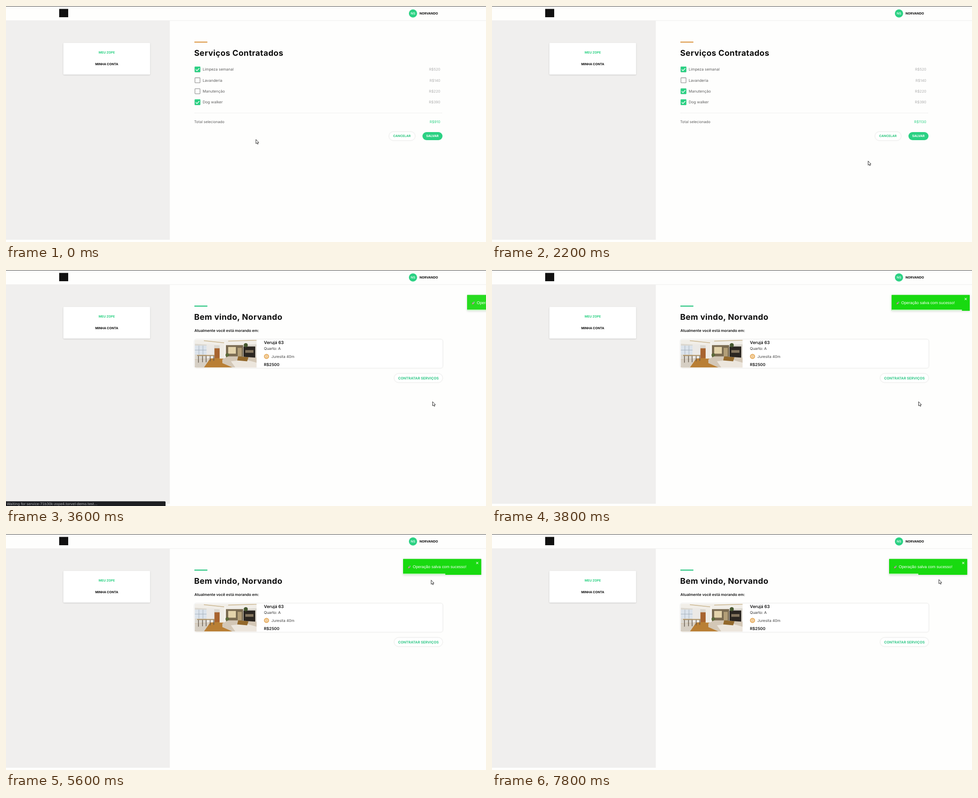
Animation of 1065x526 px, one loop 8000 ms. Source, as an HTML page:

```html
<!DOCTYPE html>
<html lang="pt-BR">
<head>
<meta charset="utf-8">
<title>Serviços</title>
<style>
html, body { margin: 0; width: 100%; height: 100%; overflow: hidden; background: #fefefd; }
svg { display: block; width: 1065px; height: 526px; }
text { font-family: Inter, sans-serif; font-size: 8.4px; fill: #606060; text-rendering: geometricPrecision; white-space: pre; }
.title { font-size: 17.9px; font-weight: 700; letter-spacing: .4px; fill: #0c0c0c; }
.cap { font-size: 7px; font-weight: 700; fill: #0c0c0c; }
.mid { text-anchor: middle; }
.end { text-anchor: end; }
.semi { font-weight: 600; fill: #151515; }
.price { font-size: 8px; fill: #adadad; }
.green { fill: #2bd183; }
.soft { filter: drop-shadow(0 1px 1.5px rgba(0,0,0,.16)); }
.pill { fill: #fff; stroke: #eeeeed; stroke-width: .8; filter: drop-shadow(0 .5px 1px rgba(0,0,0,.1)); }
.toast text { font: 8.9px "Liberation Sans", Arial, sans-serif; fill: #fff; }
.toast .box { filter: drop-shadow(0 1px 2.5px rgba(0,0,0,.14)); }
.status text { font: 7.6px "DejaVu Sans", sans-serif; fill: #b4b5b7; }
</style>
</head>
<body>
<svg viewBox="0 0 1065 526">
  <rect width="1065" height="526" fill="#fefefd"/>
  <rect y="33" width="363.5" height="488" fill="#f0efee"/>
  <rect y="32" width="1065" height="1" fill="#efefee"/>
  <rect width="1065" height="1" fill="#3c3c3c"/>
  <rect x="118" y="6.5" width="20" height="18.5" fill="#111"/>
  <circle class="green" cx="903" cy="16.6" r="9.1"/>
  <text class="cap mid" x="903" y="19" style="fill:#e6fff2;font-weight:600">NS</text>
  <text class="cap" x="917.5" y="19.4">NORVANDO</text>

  <rect class="soft" x="127.3" y="82.3" width="192.4" height="70.4" rx="1.5" fill="#fff"/>
  <text class="cap mid" x="223.5" y="105.6" style="fill:#2bd183">MEU ZOPE</text>
  <text class="cap mid" x="223.5" y="131.6">MINHA CONTA</text>

  <g id="services">
    <rect x="418" y="79.2" width="28.8" height="2.6" fill="#e0a35a"/>
    <text class="title" x="417.5" y="111.2">Serviços Contratados</text>
    <g id="rows"></g>
    <rect x="418" y="238" width="550" height="1" fill="#eeeeed"/>
    <text x="417.5" y="261.2" style="font-size:8.1px">Total selecionado</text>
    <text id="total" class="price end" x="963.6" y="261.2" style="fill:#2bd183"></text>
    <rect class="pill" x="850" y="280.5" width="57.5" height="19" rx="9.5"/>
    <text class="cap mid" x="878.5" y="292.3" style="fill:#2bc67d">CANCELAR</text>
    <rect class="green" x="924" y="281" width="44.5" height="18" rx="9"/>
    <text class="cap mid" x="946" y="292.3" style="fill:#fff">SALVAR</text>
  </g>

  <g id="home">
    <rect x="418" y="79.2" width="28.8" height="2.6" fill="#3dcb8d"/>
    <text class="title" x="417.5" y="111.2">Bem vindo, Norvando</text>
    <text class="semi" x="418" y="138.4">Atualmente você está morando em:</text>
    <rect class="pill" x="418" y="154.5" width="551" height="64" rx="4.5"/>
    <clipPath id="frame"><path d="M137 0H4Q0 0 0 4V58Q0 62 4 62H137V0z"/></clipPath>
    <g transform="translate(419 155.5)" clip-path="url(#frame)">
      <rect width="137" height="62" fill="#dcd8d0"/>
      <path d="M0 0H137V10L66 13L0 9z" fill="#f1eee8"/>
      <path d="M20 2L66 7M74 3L137 1" stroke="#c9b48c" stroke-width="1.6"/>
      <rect y="13" width="26" height="20" fill="#dbe3ec"/>
      <path d="M9 13V33M18 13V33M0 23H26" stroke="#9ba6b1" stroke-width=".8"/>
      <rect x="26" y="10" width="17" height="33" fill="#ebe9e6"/>
      <rect x="43.5" y="19" width="11.5" height="25" fill="#a8642f"/>
      <path d="M0 44L62 40L84 62H0z" fill="#b97f35"/>
      <path d="M0 44L34 42L20 62H0z" fill="#d6cfc4"/>
      <path d="M5 35H44" stroke="#a98a58" stroke-width="2"/>
      <path d="M8 36V51M17 36V50M25 36V50M34 36V48M42 36V47" stroke="#5d5348" stroke-width="1.4"/>
      <rect x="55" y="10" width="10" height="32" fill="#efece5"/>
      <rect x="69" y="12" width="38" height="27" fill="#7a6b51"/>
      <rect x="74" y="16" width="17" height="15" fill="#e3d3ab"/>
      <rect x="95" y="18" width="9" height="19" fill="#b39f78"/>
      <rect x="65" y="5" width="4" height="36" fill="#f5f2ec"/>
      <rect x="108" y="15" width="26" height="30" fill="#2b2621"/>
      <rect x="112" y="23" width="18" height="6" fill="#85765f"/>
      <circle cx="113" cy="12" r="4.5" fill="#45572f"/>
      <circle cx="72" cy="34" r="4" fill="#5d6a3a"/>
      <path d="M61 44L74 37H94L137 40V62H84L61 52z" fill="#d3c7b6"/>
      <path d="M80 48L112 44L137 51V62H90z" fill="#ece6dd"/>
      <path d="M96 37L119 39L116 48L94 46z" fill="#93692c"/>
    </g>
    <text class="semi" x="572.3" y="165" style="font-size:9.5px">Verujá 63</text>
    <text x="572.3" y="178.4" style="font-size:8.3px;fill:#333">Quarto: A</text>
    <circle cx="578" cy="192.6" r="5.6" fill="#e3a552"/>
    <g fill="none" stroke="#fff3e0" stroke-width=".8">
      <circle cx="578" cy="192.6" r="3.4"/>
      <path d="M576.8 189.6V195.6M579.2 189.6V195.6M574.6 192.6H581.4"/>
    </g>
    <text x="588.8" y="195.6" style="font-size:8.25px;fill:#444">Juresita 40m</text>
    <text class="semi" x="572.3" y="213.8" style="font-size:8.9px">R$2500</text>
    <rect class="pill" x="861.5" y="231" width="107" height="19.5" rx="9.75"/>
    <text class="cap mid" x="915" y="243.5" style="font-size:7.8px;fill:#35c98a">CONTRATAR SERVIÇOS</text>
  </g>

  <g id="status" class="status">
    <path d="M0 515.5H352Q354 515.5 354 517.5V526H0z" fill="#1d1e22"/>
    <text x="2" y="524">Waiting for service-71b30k-zope4.torvel-demo.test…</text>
  </g>

  <g id="toast" class="toast">
    <rect class="box" width="173.5" height="35.6" y="55.4" rx=".6" fill="#18da10"/>
    <g transform="translate(14.2 73.3) rotate(45) scale(.8)">
      <path d="M-2 1L-3.4 4H3.4L2 1z" fill="#9c4a3c"/>
      <ellipse rx="2" ry="4.2" fill="#a9b8a6"/>
      <circle cy="-1" r="1.1" fill="#39606e"/>
      <path d="M-1 4.2H1L0 6z" fill="#d9a544"/>
    </g>
    <text x="21.5" y="76.4">Operação salva com sucesso!</text>
    <path d="M162.2 62.3l4.6 4.6m0-4.6l-4.6 4.6" stroke="#e4fbe2" stroke-width="1.1"/>
    <rect id="bar" y="88.3" height="2.7" fill="#fff" opacity=".8"/>
  </g>

  <g id="cursor" stroke="#222" stroke-width=".95" fill="#fff" stroke-linejoin="round">
    <path id="arrow" d="M.5 .5V9.8L2.6 7.9L4.1 11L5.6 10.3L4.2 7.3H6.9z"/>
    <path id="hand" d="M-.8 .9C-.8-.2 .8-.2 .8 .9V3.7L4.5 4.4Q5.6 4.7 5.4 5.8L4.9 8.4Q4.7 9.4 3.7 9.4H.5Q-.3 9.4-.7 8.7L-3.2 5.6Q-2.6 4.6-1.7 5.2L-.8 5.9z"/>
  </g>
</svg>
<script>
const LOOP = 8000, STEP = 100;
const $ = id => document.getElementById(id);
const show = (id, on) => { $(id).style.display = on ? '' : 'none'; };
const within = (t, spans) => spans.some(([a, b]) => t >= a && t < b);

// time, x, y of the pointer tip
const PATH = [
  [300, 554, 297], [400, 550, 293], [600, 510, 262], [800, 452, 207], [1000, 430, 187],
  [1600, 430, 187], [1700, 445, 196], [1900, 600, 270], [2200, 834, 345], [2400, 925, 334],
  [2500, 945, 316], [2700, 949, 302], [3000, 946, 293],
  [4100, 946, 293], [4400, 952, 262], [4800, 969, 130], [4900, 955, 112], [5100, 912, 102],
  [5300, 921, 102], [5400, 926, 103], [5900, 968, 101], [6200, 989, 97], [6300, 991, 95],
  [6400, 991, 95], [6500, 999, 69], [7600, 999, 69], [7700, 996, 93], [7800, 991, 101]
];
const HAND = [[900, 1700], [2800, 3300], [6500, 7700]];

// time, left edge of the toast: overshoot, then settle
const SLIDE = [[3500, 1400], [3600, 1023], [3700, 868], [3800, 886.5], [3900, 878], [4000, 881]];

const SERVICES = [
  ['Limpeza semanal', 520, 0],
  ['Lavanderia', 140, Infinity],
  ['Manutenção', 220, 1400],
  ['Dog walker', 390, 0]
];

$('rows').innerHTML = SERVICES.map(([name, price], i) => {
  const y = 141.2 + i * 24.4;
  return `<g transform="translate(0 ${y})">
    <rect x="419.3" y="-5.6" width="11.2" height="11.2" rx=".8" fill="none" stroke="#969696" stroke-width="1.3"/>
    <g id="check${i}"><rect class="green" x="418.6" y="-6.3" width="12.6" height="12.6" rx="1"/>
    <path d="M421 .3l2.7 2.7 5.2-5.5" fill="none" stroke="#fff" stroke-width="1.5"/></g>
    <text x="436.3" y="2.9">${name}</text>
    <text class="price end" x="963.6" y="2.9">R$${price}</text></g>`;
}).join('');

function sample(keys, t) {
  const n = keys.findIndex(k => k[0] > t);
  if (n === 0) return keys[0].slice(1);
  if (n < 0) return keys[keys.length - 1].slice(1);
  const a = keys[n - 1], b = keys[n], u = (t - a[0]) / (b[0] - a[0]);
  return a.slice(1).map((v, i) => v + (b[i + 1] - v) * u);
}

function draw(t) {
  show('services', t < 3300);
  show('home', t >= 3300);
  show('status', t >= 3300 && t < 3700);

  let sum = 0;
  SERVICES.forEach(([, price, from], i) => {
    show('check' + i, t >= from);
    if (t >= from) sum += price;
  });
  $('total').textContent = 'R$' + sum;

  show('toast', t >= 3600);
  $('toast').setAttribute('transform', `translate(${sample(SLIDE, t)[0]} 0)`);
  $('toast').setAttribute('opacity', t < 3700 ? .93 : 1);
  // the countdown pauses while hovered
  const spent = Math.min(t, 6300) - 3300 + Math.max(0, t - 7670);
  $('bar').setAttribute('width', 173.5 * Math.min(1, 1 - spent / 5000));

  const hand = within(t, HAND);
  show('hand', hand);
  show('arrow', !hand);
  $('cursor').setAttribute('transform', `translate(${sample(PATH, t).join(' ')})`);
}

const start = performance.now();
function tick() {
  const t = (performance.now() - start) % LOOP;
  draw(Math.floor(t / STEP) * STEP);
  requestAnimationFrame(tick);
}
tick();
</script>
</body>
</html>
```
